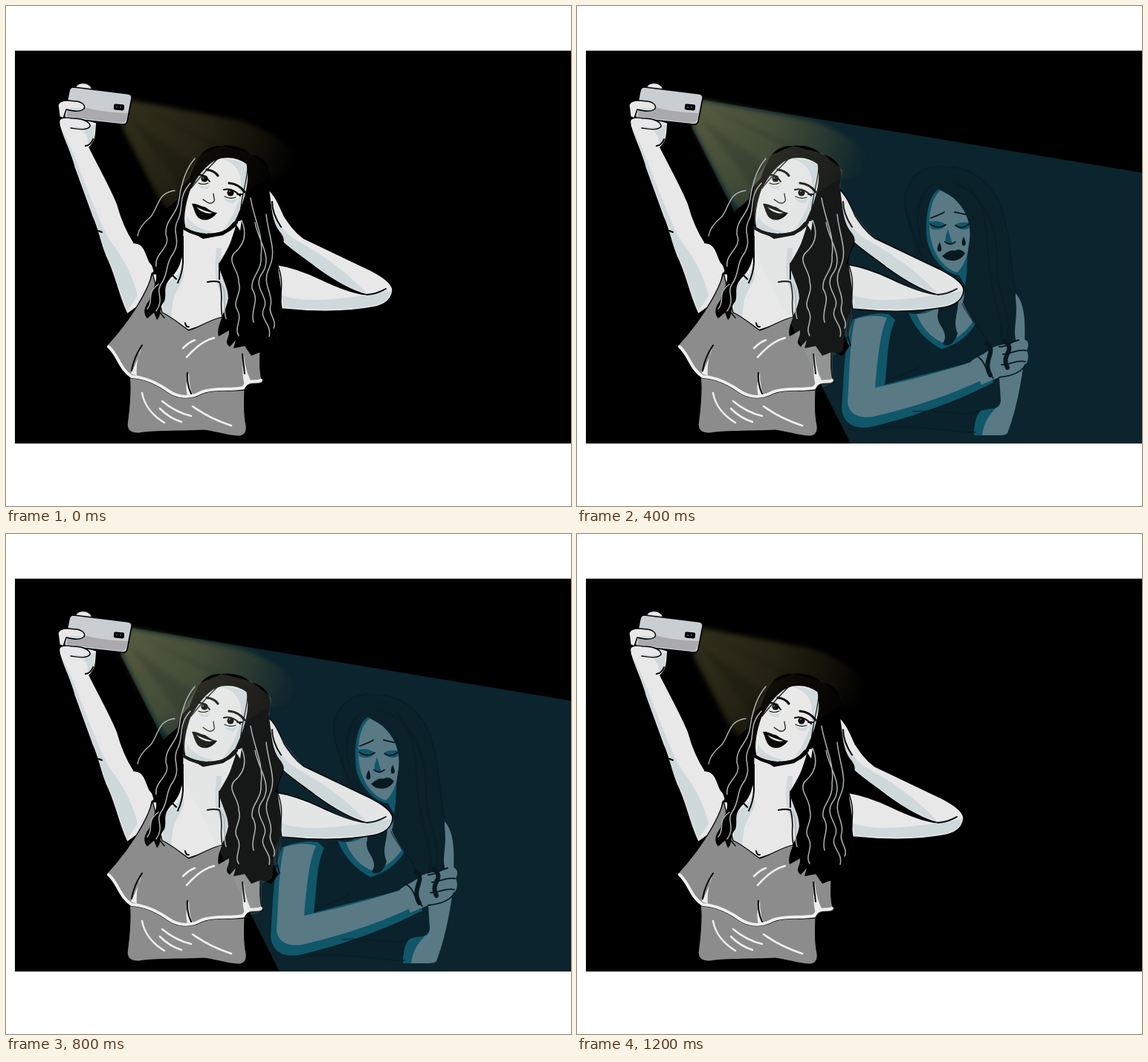
Recreate the animation shown at these times as an HTML page. Size 760 by 672 pixels, loop 1.3 s.

```html
<!DOCTYPE html>
<html lang="en">
<head>
<meta charset="utf-8">
<title>Selfie light</title>
<style>
html, body { margin: 0; width: 100%; height: 100%; overflow: hidden; background: #fff; }
svg { display: block; width: 760px; height: 672px; }
path { stroke-linecap: round; stroke-linejoin: round; }
.bg { fill: var(--bg); }
.skin2 { fill: var(--skin); }
.shade2 { fill: var(--shade); }
.dark { fill: var(--dark); }
.ink2 { fill: var(--line); }
.line2 { fill: none; stroke: var(--line); stroke-width: 1.8; }
.skin { fill: #e8e8e8; stroke: #000; stroke-width: 1.4; }
.shade { fill: #cfd9dc; }
.top { fill: #8c8c8c; stroke: #000; stroke-width: 1.2; }
.ink { fill: none; stroke: #050505; stroke-width: 2; }
.hem { fill: none; stroke: #efefef; stroke-width: 4; }
.strand { fill: none; stroke: #aeb2b2; stroke-width: 1.5; }
#spill { mix-blend-mode: screen; opacity: .4; }
</style>
</head>
<body>
<svg viewBox="0 0 760 672">
  <defs>
    <radialGradient id="glow" gradientUnits="userSpaceOnUse" cx="163" cy="136" r="240">
      <stop offset="0" stop-color="#86804a"/>
      <stop offset=".45" stop-color="#807844" stop-opacity=".8"/>
      <stop offset=".72" stop-color="#78703c" stop-opacity=".48"/>
      <stop offset="1" stop-color="#6e6638" stop-opacity="0"/>
    </radialGradient>
    <filter id="soft"><feGaussianBlur stdDeviation="3"/></filter>
    <clipPath id="room"><path d="M12 60H760V588H12Z"/></clipPath>
    <clipPath id="front"><path d="M238 235L262 200L290 188L330 198L357 220L354 248L376 282L400 312L488 354L520 382L493 405L371 408L365 460L344 470V507L322 516V496L238 328ZM423 369L485 388L416 350L372 318L362 347Z" clip-rule="evenodd"/></clipPath>
  </defs>

  <path d="M12 60H760V588H12Z"/>

  <g clip-path="url(#room)">
    <path class="bg" d="M168 126L760 224V588H368L154 162Z"/>

    <!-- sad figure in the beam -->
    <g id="sad">
      <path class="dark" opacity=".35" d="M487 215C455 218 437 245 442 275C446 305 458 330 470 350L450 410L418 420L408 570H540L575 520L596 440C590 385 590 355 578 310C575 250 535 213 487 215Z"/>
      <path class="shade2" d="M371 421C390 414 408 412 419 414L428 422C417 445 418 480 414 509L440 502L550 474L560 506C510 532 450 553 394 566C372 569 358 561 356 541C359 500 359 455 371 421Z"/>
      <path class="skin2" d="M374 421C390 416 404 415 417 419C407 440 404 480 401 513C445 504 495 490 532 478L544 503C500 524 445 541 398 552C377 555 364 547 364 530C367 492 366 455 374 421Z"/>
      <path class="shade2" d="M446 412C470 422 498 384 520 382L536 427C526 445 508 456 490 461C470 450 455 434 446 412Z"/>
      <path class="skin2" d="M457 414C478 416 500 392 519 386L532 425C520 442 506 450 491 452C475 445 463 431 457 414Z"/>
      <path class="skin2" d="M590 386C603 401 603 425 602 455L601 480C596 515 590 545 579 574Q577 577 568 577H534C535 562 538 550 544 545C560 541 569 542 570 530L568 499L588 440Z"/>
      <path class="shade2" d="M534 577C534 560 538 544 547 543C560 540 567 542 568 536C554 549 547 560 545 577Z"/>
      <path class="shade2" d="M487 246C473 253 467 286 471 315C476 340 495 360 514 362L522 376L530 320L526 275Z"/>
      <path class="skin2" d="M489 248C478 257 474 275 474 292C473 325 490 352 511 358C524 348 530 320 530 295C528 270 505 255 489 248Z"/>
      <path class="shade2" d="M474 290C481 288 490 289 496 294C494 300 482 303 475 298ZM509 294C514 290 523 290 529 292L527 299C520 302 512 300 509 294ZM499 300C496 309 494 315 497 319L505 320Z"/>
      <path class="ink2" d="M491 336C498 330 503 327 508 329C514 326 518 328 522 332C518 340 510 343 503 342C498 342 494 339 491 336ZM488 317C483 326 484 330 488 330C492 329 490 323 488 317ZM520 310C516 319 518 323 521 322C524 321 523 316 520 310Z"/>
      <path class="line2" d="M476 285C482 282 488 281 494 277M508 277C515 278 520 281 525 280M475 293C483 299 490 298 496 294M509 295C516 300 523 298 530 290M495 317Q502 323 509 317"/>
      <!-- hair -->
      <path class="dark" d="M487 246C515 258 532 284 528 315C522 345 527 373 519 398C528 421 550 440 554 464C550 480 548 490 557 498C565 490 567 483 574 488C585 476 578 462 592 453C584 438 595 420 589 387C582 362 584 330 574 302C568 272 555 245 535 235C518 221 497 224 484 234Z"/>
      <path class="dark" d="M486 245C467 256 465 290 471 323C481 345 500 355 507 377C522 400 502 420 512 440C508 455 498 459 492 454C502 438 484 430 485 415C492 396 463 386 460 360C449 324 449 280 462 257Z"/>
      <path class="line2" opacity=".5" d="M487 215C451 218 435 247 443 279C453 308 459 330 469 344M491 216C536 213 569 247 576 292C586 330 582 357 590 382M481 239C457 251 454 289 463 316M500 235C550 250 566 300 565 347C565 392 585 410 579 447M525 240C559 275 548 325 557 369C564 415 577 430 568 456M518 400C532 430 553 438 554 465M399 569C440 559 495 573 536 573M418 502C430 500 455 489 463 484M452 545C490 541 521 554 541 544"/>
      <!-- hand -->
      <path class="skin2" d="M529 479C534 472 550 468 557 460C568 454 584 455 594 449C606 445 610 454 605 463C609 471 606 479 602 484C595 494 579 495 568 499L544 509Z"/>
      <path class="line2" d="M604 463C590 461 583 468 573 468M603 478C591 475 582 483 571 482M568 458C580 459 581 451 594 449M568 499C586 497 599 491 603 482"/>
      <path class="line2" style="stroke-width:6" d="M551 454C566 464 544 476 556 496M575 450C592 464 569 467 579 486"/>
      <path class="line2" d="M536 470C550 475 547 489 560 500"/>
    </g>

    <!-- phone light -->
    <g class="lamp" filter="url(#soft)">
      <g id="rays">
        <path fill="url(#glow)" d="M166 126L315 154C370 172 406 206 402 226L350 234L246 300L206 260L156 163Z"/>
        <path fill="#000" opacity=".15" d="M165 150L272 226L238 247ZM170 132L350 215L308 205Z"/>
      </g>
    </g>
  </g>

  <!-- smiling figure -->
  <g>
    <path class="skin" d="M71 157C74 148 87 150 105 152L122 157C120 170 123 179 112 190C124 214 141 244 150 267C154 282 160 299 172 318C185 318 192 332 199 355L196 390L163 414C151 390 147 362 134 336C126 317 124 300 116 283L92 217C87 196 77 180 71 157Z"/>
    <path class="shade" d="M75 165C91 195 102 230 116 263C124 282 131 302 142 318C158 339 172 366 177 389L163 411C152 381 146 357 132 328L122 294L94 218ZM98 166L120 159L117 181L109 188C112 175 106 168 98 166Z"/>
    <path class="ink" d="M124 302L129 304M107 188Q114 187 117 179M172 318Q186 319 188 330"/>
    <path class="skin" d="M93 111C95 102 108 101 115 109V117H96Z"/>
    <path fill="#c8ced1" stroke="#000" stroke-width="1.6" d="M91 109L164 118Q170 119 169 124L163 155Q162 160 156 159L82 151Q77 150 79 145L85 114Q86 109 91 109Z"/>
    <path fill="#aaa9ac" d="M84 127C106 140 137 143 164 144L161 154Q160 157 155 157L82 149Z"/>
    <rect x="145" y="132" width="14" height="8" rx="2" transform="rotate(6 152 136)"/>
    <path d="M149 136h.1M154 136h.1" stroke="#adb4b6" stroke-width="1.6"/>
    <path class="skin" d="M70 133C73 125 84 127 94 128C104 129 108 135 104 139C98 143 89 141 81 139L77 151L72 149Z"/>
    <path class="skin" d="M72 159C69 150 78 149 89 151C103 151 114 156 113 162C108 168 96 165 87 164"/>
    <path class="shade" d="M88 137L102 137Q100 141 83 138ZM91 162Q104 165 111 161Q106 167 91 163Z"/>

    <!-- bent arm -->
    <path class="skin" d="M353 247C361 253 367 266 374 282C382 294 389 304 400 312C427 325 461 341 488 354C505 363 520 372 520 382C519 394 510 402 493 405C456 412 408 411 371 407L361 347C381 350 404 358 423 367C446 378 466 386 485 388C462 382 438 367 416 351C402 340 385 329 372 317C365 300 352 278 353 247Z"/>
    <path class="shade" d="M355 260C363 287 373 304 389 314C421 331 456 355 485 386C462 380 437 365 416 349C400 338 386 328 373 315C362 298 357 280 355 260ZM371 389C411 402 465 391 518 383C517 394 509 400 493 403C455 409 409 409 373 405Z"/>
    <path class="ink" d="M358 263Q358 279 370 297M485 388Q499 387 511 380"/>

    <!-- neck and chest -->
    <path class="skin" stroke-width="0" d="M238 292L237 336C228 360 211 360 196 360L188 400L211 416L244 436L289 421L305 390L292 350L312 290Z"/>
    <path class="shade" d="M238 342C236 362 223 368 212 376L210 413L222 420L224 401C226 382 241 372 239 358ZM283 325C282 340 278 360 287 382L294 405L289 418L305 390L288 360L290 325Z"/>
    <path class="ink" d="M238 310V345Q237 360 231 372M287 346V367M271 371Q280 369 287 371M241 426Q242 432 246 431M222 360L229 367"/>

    <!-- top -->
    <path class="top" d="M166 497C169 520 165 546 163 563Q164 575 179 574C207 570 237 572 266 570C284 572 301 579 315 578Q325 576 323 563C319 546 321 530 321 512Z"/>
    <path class="top" d="M197 358C191 385 164 426 135 457C150 467 151 487 168 500C187 501 202 508 216 518C230 528 247 530 264 521C282 514 302 519 321 516C326 503 336 511 345 506C340 489 342 475 342 460L310 426L291 418C275 421 260 432 246 436C232 426 220 416 210 412Z"/>
    <path class="hem" d="M138 458C151 469 152 487 169 498C186 499 204 507 218 517C231 526 247 528 263 519C282 512 301 517 319 513C326 500 335 507 343 503"/>
    <path fill="#ededed" d="M183 456Q178 475 168 494L176 497Q174 478 183 456ZM246 493Q240 510 244 524L251 523Q246 510 246 493ZM320 468Q316 491 321 511L329 503Q321 487 320 468Z"/>
    <path class="ink" d="M183 456Q172 472 169 490M244 493Q243 508 249 521M318 468L321 494"/>
    <path class="hem" style="stroke-width:2.5" d="M238 460Q247 451 254 449M243 472Q261 451 280 446M183 520C186 537 198 551 213 560M207 541Q220 554 236 559M210 531Q228 546 249 551M251 538Q273 554 303 564"/>

    <!-- hair -->
    <path d="M288 188C265 188 256 205 247 232C238 240 232 250 231 260C222 268 211 275 204 287C195 300 169 304 174 319C186 320 188 336 193 345C212 365 196 378 193 395C187 403 183 412 190 420L199 412L203 422C210 416 205 405 213 397C217 385 209 377 224 363C239 347 236 332 238 313L238 297L265 313L292 308L309 296C306 312 297 330 286 347C289 364 299 377 299 393C295 414 282 430 286 444L300 436C301 447 292 451 301 458L309 449L306 460L321 457L330 470L343 465L357 470L367 457C359 449 358 438 364 420C377 398 367 366 365 344C368 321 381 319 368 303C356 288 358 266 353 242C361 218 348 203 329 199C319 189 303 186 288 188Z"/>
    <path class="skin" stroke-width="0" d="M289 204C273 208 260 226 248 245C241 263 237 286 241 298C253 306 278 309 292 303C304 297 309 288 314 273C321 253 329 230 324 212C314 204 301 202 289 204Z"/>
    <path class="shade" d="M282 207C263 218 252 239 248 249C261 232 271 216 282 207ZM323 213C311 207 301 205 289 205C307 210 316 222 316 237C317 260 305 284 292 301L308 289C319 266 330 235 323 213ZM244 282C249 294 263 301 278 303L270 306Q252 304 241 298ZM258 239Q267 246 274 240L271 246Q260 247 258 239ZM293 258Q302 263 313 258L306 265Q296 265 293 258Z"/>
    <path d="M308 291L317 288L315 302Z" fill="#e8e8e8"/>

    <!-- face -->
    <path class="ink" style="stroke-width:3.2" d="M270 220Q280 221 285 228M300 238Q313 239 321 250"/>
    <circle cx="267" cy="232" r="4.6"/><circle cx="302" cy="251" r="4.6"/>
    <path d="M265 231h.1M301 249h.1" stroke="#ddd" stroke-width="1.5"/>
    <path class="ink" d="M257 228Q266 224 274 236M293 247Q304 244 315 255M257 230L253 229M311 253L318 253"/>
    <path class="ink" style="stroke-width:1.2" d="M279 252C279 256 281 259 280 262Q277 267 271 264L265 260M259 238Q265 241 272 238M294 256Q302 260 309 257M325 215C325 235 316 255 315 281M285 205Q263 227 249 245"/>
    <path d="M250 266C258 265 261 269 267 270C272 272 274 276 284 278C278 286 269 290 261 286C254 282 254 274 250 266Z"/>
    <path d="M256 270Q265 275 278 278Q266 281 256 270Z" fill="#f4f4f4"/>
    <path class="ink" style="stroke-width:4" d="M240 299Q262 313 288 306Q303 302 310 291"/>

    <!-- highlights -->
    <path class="strand" d="M254 205C239 222 235 245 233 259C230 282 214 286 215 307C223 325 199 332 202 350M248 238C230 258 240 271 231 288C222 305 237 314 224 334C214 347 219 359 209 373C200 386 214 392 202 410M227 248C204 251 206 268 195 283Q179 296 177 309M205 374C187 387 200 396 190 407M317 288C326 310 318 323 307 332C297 344 314 356 313 371C318 386 304 397 311 408C319 422 306 432 313 443M335 291C339 315 358 335 346 357C329 378 355 390 347 406C340 421 358 427 354 444M329 258C333 285 347 309 343 335C345 357 329 363 331 380C342 398 328 407 333 425M350 280C353 310 365 329 354 352C343 374 360 386 356 402C352 414 365 422 360 433M288 372C300 386 290 402 296 420"/>
    <path class="ink" style="stroke-width:1.5" d="M365 347C377 376 365 393 371 409C362 427 363 443 368 456M287 371C293 388 287 399 291 417M207 412L213 419"/>
  </g>

  <!-- light falling over the front figure -->
  <path id="tint" fill="#bed2cd" d="M168 126L530 186V420L360 445L348 548L154 162Z" clip-path="url(#front)"/>
  <g id="spill" clip-path="url(#front)"><g class="lamp"><use href="#rays"/></g></g>
</svg>
<script>
const root = document.documentElement.style;
const sad = document.getElementById("sad");
const lamps = document.querySelectorAll(".lamp");
const tint = document.getElementById("tint");
const rgb = c => `rgb(${c.map(v => Math.max(0, Math.round(v))).join(",")})`;
let shown = -1;

function draw(now) {
  // thirteen 100 ms steps: six up, six down
  const step = Math.floor(now % 1300 / 100);
  const level = 6 - Math.abs(6 - step);
  if (level !== shown) {
    shown = level;
    const bg = [8 * level - 21, 14.75 * level - 23.5, 17.5 * level - 25];
    root.setProperty("--bg", rgb(bg));
    root.setProperty("--dark", rgb(bg.map(v => v * .93)));
    root.setProperty("--line", rgb(bg.map(v => v * .7)));
    root.setProperty("--skin", rgb([133, 181, 200].map(v => v * level / 6)));
    root.setProperty("--shade", rgb([9 * level - 20, 25 * level - 13, 28 * level - 6]));
    sad.style.display = level ? "" : "none";
    for (const lamp of lamps) lamp.style.opacity = .36 + .24 * Math.min(1, level / 3);
    tint.style.opacity = .17 * level / 6;
  }
  requestAnimationFrame(draw);
}
draw(performance.now());
</script>
</body>
</html>
```
